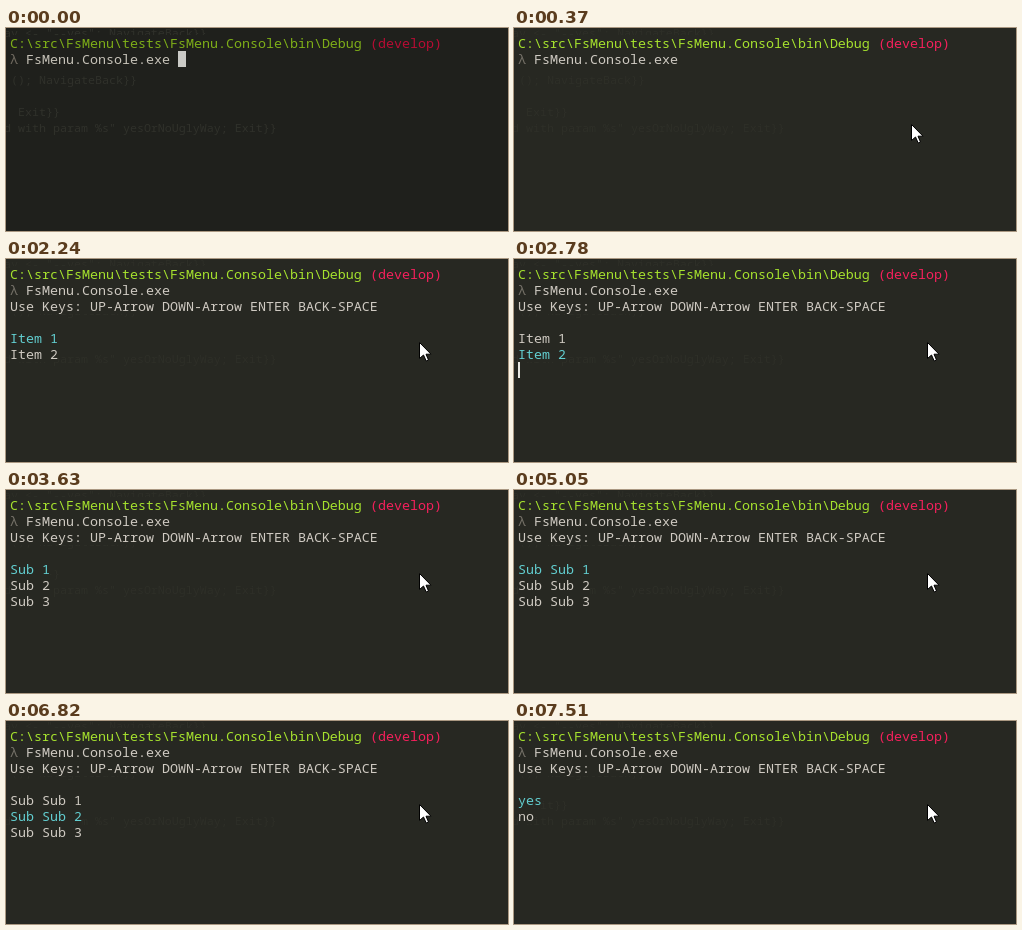
Recreate the animation shown at these times as an HTML page with a canvas. Size 502 by 203 pixels, loop 8000 ms.

```html
<!DOCTYPE html>
<html lang="en">
<head>
<meta charset="utf-8">
<title>Console menu</title>
<style>
  html, body { margin: 0; width: 100%; height: 100%; overflow: hidden; background: #272822; }
  canvas { display: block; }
</style>
</head>
<body>
<canvas id="stage" width="502" height="203"></canvas>
<script>
const ctx = document.getElementById('stage').getContext('2d');
const LOOP = 8000, LEFT = 4, TOP = 7, CELL = 8, ROW = 16;
const FONT = '13.333px "Noto Sans Mono", "DejaVu Sans Mono", monospace';
const GHOST_FONT = '11.667px "Noto Sans Mono", "DejaVu Sans Mono", monospace';

// Each colour: unfocused and focused window
const COLORS = {
  back:  [[31, 32, 28], [39, 40, 34]],
  ghost: [[48, 49, 43], [46, 47, 40]],
  path:  [[126, 174, 24], [166, 226, 46]],
  git:   [[184, 12, 52], [245, 32, 92]],
  mark:  [[112, 106, 96], [117, 113, 104]],
  text:  [[198, 194, 184], [207, 202, 194]],
  pick:  [[80, 176, 186], [98, 206, 208]],
  caret: [[202, 202, 198], [232, 232, 226]]
};

const GHOSTS = [
  [-2, 9, 'ay <- "--yes"; NavigateBack}}'],
  [5, 56, '(); NavigateBack}}'],
  [5, 88, ' Exit}}'],
  [-2, 104, 'd with param %s" yesOrNoUglyWay; Exit}}']
];

const HELP = 'Use Keys: UP-Arrow DOWN-Arrow ENTER BACK-SPACE';
const ITEMS = ['Item 1', 'Item 2'];
const SUBS = ['Sub 1', 'Sub 2', 'Sub 3'];
const SUB_SUBS = SUBS.map(s => 'Sub ' + s);

// Start time, entries, selected entry
const MENUS = [
  [1700, ITEMS, 0],
  [2470, ITEMS, 1],
  [3080, SUBS, 0],
  [5050, SUB_SUBS, 0],
  [6670, SUB_SUBS, 1],
  [7050, ['yes', 'no'], 0]
];

// Caret visible from..to
const CARET = [[0, 370], [920, 1460], [1630, 2240], [2780, 3630], [4180, 4730],
  [5280, 5740], [6290, 6820], [7050, 7510]];

const ARROW = [[0, 0], [0, 16], [4, 12.5], [6.7, 18.5], [9, 17.5], [6.5, 11.7], [11.5, 11.7]];

let focus = 0;

function color(name) {
  const [a, b] = COLORS[name];
  return `rgb(${a.map((v, i) => Math.round(v + (b[i] - v) * focus))})`;
}

const rowTop = row => TOP + row * ROW;

function box(name, x, y, w, h) {
  ctx.fillStyle = color(name);
  ctx.fillRect(x, y, w, h);
}

function write(row, col, text, name) {
  const x = LEFT + col * CELL;
  box('back', x, rowTop(row), text.length * CELL, ROW);
  ctx.font = FONT;
  ctx.fillStyle = color(name);
  ctx.fillText(text, x, rowTop(row) + 13);
}

function drawGhosts() {
  ctx.font = GHOST_FONT;
  ctx.fillStyle = color('ghost');
  for (const [x, y, text] of GHOSTS) ctx.fillText(text, x, y);
}

function drawCaret(t, menu) {
  if (!CARET.some(([from, to]) => t >= from && t < to)) return;
  let x = LEFT, row = 2;
  if (menu) row = 4 + menu[1].length;
  else if (t < 1630) { x = 172; row = 1; }
  box('caret', x, rowTop(row), t < 70 ? CELL : 2, ROW);
}

function pointerAt(t) {
  if (t >= 620) return [413, 83];
  if (t >= 540) return [406, 89];
  const k = 1 - Math.min(1, Math.floor((t - 70) / 75) / 4);
  return [Math.round(397 - 45 * k * k), Math.round(96 - 60 * k * k)  + Math.round(120 * k * k)];
}

function drawPointer(t) {
  if (t < 70) return;
  const [x, y] = pointerAt(t);
  ctx.beginPath();
  for (const [px, py] of ARROW) ctx.lineTo(x + px + 0.5, y + py + 0.5);
  ctx.closePath();
  ctx.fillStyle = '#fff';
  ctx.fill();
  ctx.strokeStyle = '#000';
  ctx.lineWidth = 1;
  ctx.stroke();
}

function draw(t) {
  focus = t < 70 ? 0 : Math.min(1, (Math.floor((t - 70) / 75) + 1) / 5);
  box('back', 0, 0, 502, 203);
  drawGhosts();

  write(0, 0, 'C:\\src\\FsMenu\\tests\\FsMenu.Console\\bin\\Debug', 'path');
  write(0, 45, '(develop)', 'git');
  write(1, 0, 'λ', 'mark');
  write(1, 2, 'FsMenu.Console.exe', 'text');

  const menu = MENUS.filter(m => t >= m[0]).pop();
  if (menu) {
    write(2, 0, HELP, 'text');
    menu[1].forEach((s, i) => write(4 + i, 0, s, i === menu[2] ? 'pick' : 'text'));
  }
  drawCaret(t, menu);
  drawPointer(t);
}

const start = performance.now();
function tick() {
  draw((performance.now() - start) % LOOP);
  requestAnimationFrame(tick);
}
tick();
</script>
</body>
</html>
```
